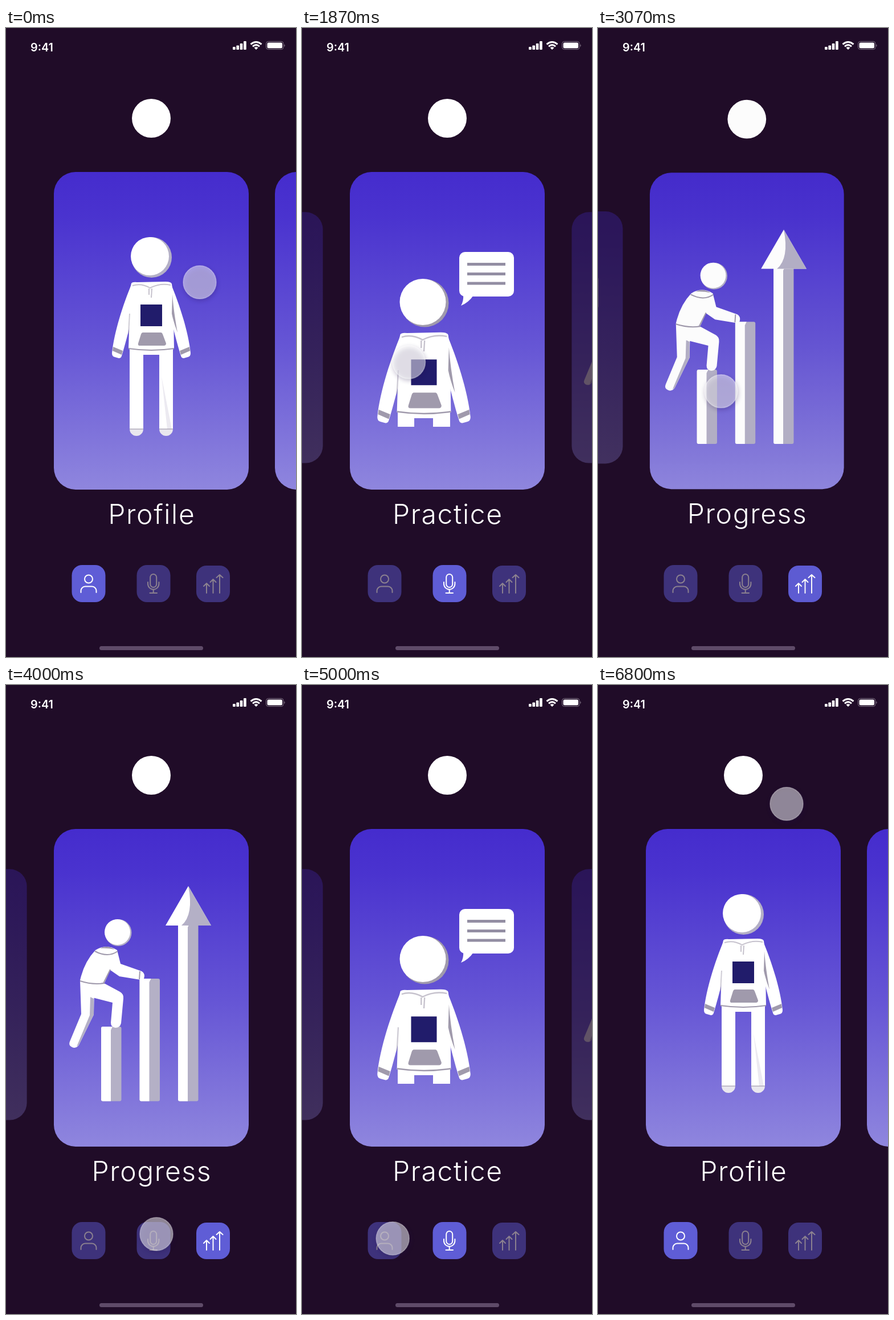
Recreate the animation shown at these times as an HTML page. Size 509 px wide and 1101 px high, loop 6870 ms.

```html
<!DOCTYPE html>
<html lang="en">
<head>
<meta charset="utf-8">
<title>Card carousel</title>
<style>
  html, body { margin: 0; width: 100%; height: 100%; overflow: hidden; background: #200c28; }
  svg { display: block; width: 100vw; height: 100vh; }
  text { font-family: Inter, "Open Sans", sans-serif; fill: #fff; }
  .label { font-size: 48px; font-weight: 300; letter-spacing: 1.6px; text-anchor: middle; }
  .line { fill: none; stroke: #fff; stroke-width: 2; stroke-linecap: round; stroke-linejoin: round; }
  .w { fill: #fff; }
  .s { fill: #b4b0c6; }
  .g { fill: #a09aac; }
  .seam { fill: none; stroke: #a09aac; stroke-width: 2; }
</style>
</head>
<body>
<svg viewBox="0 0 509 1101">
  <defs>
    <linearGradient id="sky" x2="0" y2="1">
      <stop offset="0" stop-color="#452ccd"/>
      <stop offset=".14" stop-color="#4a33cf"/>
      <stop offset=".55" stop-color="#6656d5"/>
      <stop offset="1" stop-color="#8f86de"/>
    </linearGradient>
    <radialGradient id="press">
      <stop offset="0" stop-color="#d9d2ff" stop-opacity=".6"/>
      <stop offset=".6" stop-color="#b9b2f4" stop-opacity=".4"/>
      <stop offset="1" stop-color="#b9b2f4" stop-opacity=".36"/>
    </radialGradient>
    <filter id="blur" x="-30%" y="-30%" width="160%" height="160%"><feGaussianBlur stdDeviation="4"/></filter>

    <g id="card">
      <circle class="w" cx="255" cy="158" r="34"/>
      <rect x="84" y="252" width="342" height="556" rx="38" fill="url(#sky)"/>
    </g>

    <g id="hoodie">
      <g id="sleeve">
        <path class="w" d="M221 447C207 480 190 530 186 569Q186 575 191 576L198 578Q202 578 203 574C210 552 215 530 222 505Z"/>
        <path class="g" d="M188 558L205 565L203 572L187 565Z"/>
      </g>
      <use href="#sleeve" transform="translate(510 0) scale(-1 1)"/>
      <path class="w" d="M220 447Q222 444 230 445L280 444Q290 444 291 448Q295 475 294 500L295 562Q255 568 215 562L217 500Q214 470 220 447Z"/>
      <path class="g" d="M292 466Q294 495 301 533Q294 515 291 500Z"/>
      <path class="seam" d="M215 561Q255 567 295 561"/>
      <path class="seam" stroke-width="1" opacity=".6" d="M222 451Q237 446 253 455Q270 446 289 450M251 456L251 467M256 456L255 472"/>
      <path class="seam" opacity=".5" d="M217 500L215 535"/>
      <path class="g" d="M240 533H272Q274 533 275 536L281 552Q281 556 277 556H235Q231 556 232 552L237 536Q238 533 240 533Z"/>
      <rect x="236" y="484" width="38" height="38" fill="#211c6b"/>
    </g>
  </defs>

  <g id="c0">
    <use href="#card"/>
    <circle class="s" cx="255.500" cy="401.500" r="35.500"/>
    <circle class="w" cx="252.500" cy="399.500" r="33.500"/>
    <path class="w" d="M217 560H293V702H269V572H241V702H217Z"/>
    <path fill="#eceaf1" d="M273 610L291 702H283Z"/>
    <path fill="#e9e7ee" d="M217 702H241A12 12 0 0 1 217 702ZM269 702H293A12 12 0 0 1 269 702Z"/>
    <path class="seam" stroke-width="1" d="M217 702H241M269 702H293" opacity=".6"/>
    <use href="#hoodie"/>
  </g>

  <g id="c1">
    <use href="#card"/>
    <circle class="g" cx="215.500" cy="481.500" r="42"/>
    <circle class="w" cx="212" cy="479.500" r="40.500"/>
    <path class="w" d="M168 668H260V698H230V683H197V698H168Z"/>
    <use href="#hoodie" transform="translate(214 534) scale(1.185) translate(-255 -445)"/>
    <rect class="w" x="276" y="392" width="96" height="78" rx="10"/>
    <path class="w" d="M283 466Q284 478 279 486Q292 481 301 468Z"/>
    <path d="M290 413.500H357M290 430.500H357M290 447H357" stroke="#938ea3" stroke-width="5"/>
  </g>

  <g id="c2">
    <use href="#card"/>
    <g id="bars"></g>
    <path class="w" d="M320 352L360 421H280Z"/>
    <path class="s" d="M320 352L360 421H308Q330 402 320 352Z"/>
    <circle class="s" cx="197" cy="433.500" r="23.500"/>
    <circle class="w" cx="195.500" cy="432.500" r="22.500"/>
    <g transform="translate(-7 0)">
      <path class="w" d="M137 517L162 530L161 577L135 630Q130 637 123 634Q116 631 119 624L139 576Z"/>
      <path class="s" d="M155 546L161 549V577L135 630L131 633L154 578Z"/>
      <path class="w" d="M138 516L181 523L207 537Q214 541 213 549L209 592Q207 600 199 600Q191 599 191 591L194 556L155 546L140 540Z"/>
      <path class="w" d="M164 464Q183 452 202 464L208 488L245 501Q252 505 249 514L243 516L206 510L190 499L180 521Q158 525 137 517Q144 485 164 464Z"/>
      <path class="g" d="M172 461Q184 454 198 463Q185 460 172 461Z"/>
      <path class="seam" stroke-width="1.500" d="M163 466Q186 478 203 466M242 501L241 515M137 518Q158 525 180 522M190 498L178 522"/>
    </g>
  </g>

  <text id="l0" class="label"></text>
  <text id="l1" class="label"></text>
  <text id="l2" class="label"></text>

  <g id="i0">
    <rect x="115.500" y="940" width="59" height="65" rx="18" fill="#5f5dd6"/>
    <circle class="line" cx="145" cy="964.500" r="7"/>
    <path class="line" d="M131.500 988V985A8 8 0 0 1 139 977.500H151A8 8 0 0 1 158.500 985V988"/>
  </g>
  <g id="i1">
    <rect x="229.500" y="940" width="59" height="65" rx="18" fill="#5f5dd6"/>
    <rect class="line" x="253.200" y="956" width="11" height="23" rx="5.500"/>
    <path class="line" d="M249 970V973A9.700 9.700 0 0 0 268.400 973V970M258.700 983V989M252.500 989H265"/>
  </g>
  <g id="i2">
    <rect x="334" y="941" width="59" height="64" rx="18" fill="#5f5dd6"/>
    <path class="line" d="M352 989V972M347 977L352 972L357 977M363.500 989V965M358.500 970L363.500 965L368.500 970M375 989V957M369.500 962L375 957L380.500 962"/>
  </g>

  <text x="43" y="40.500" font-size="19.800" font-weight="600">9:41</text>
  <g id="signal" class="w"></g>
  <path class="w" d="M439 38L435.500 34.500Q439 32 442.500 34.500Z"/>
  <path d="M429.500 28.500Q439 20.500 448.500 28.500M433 32.300Q439 27 445 32.300" fill="none" stroke="#fff" stroke-width="3"/>
  <rect x="456.500" y="23.500" width="30.500" height="14" rx="4" fill="none" stroke="#7e7284"/>
  <rect class="w" x="458.500" y="25.500" width="26.500" height="10" rx="2.500"/>
  <path d="M488.300 28.500Q491 30.500 488.300 33Z" fill="#7e7284"/>
  <rect x="164" y="1082" width="182" height="7" rx="3.500" fill="#5f4b69"/>

  <g id="cursor">
    <circle r="29" cx="1" cy="3" fill="#1b0a4a" opacity=".28" filter="url(#blur)"/>
    <circle id="idle" r="29" fill="#fff" fill-opacity=".5" stroke="#fff" stroke-opacity=".35" stroke-width="1.500"/>
    <circle id="held" r="28.500" fill="url(#press)"/>
  </g>
</svg>
<script>
const LOOP = 6870, STEP = 200 / 3;
const $ = id => document.getElementById(id);
const clamp = v => Math.min(1, Math.max(0, v));
const set = (el, attrs) => { for (const k in attrs) el.setAttribute(k, attrs[k]); };

$('bars').innerHTML = [598, 514, 418].map((y, i) => {
  const x = 167 + 67.5 * i;
  return `<rect class="s" x="${x}" y="${y}" width="35.500" height="${728.5 - y}" rx="3"/>` +
    `<path class="w" d="M${x + 3} ${y}H${x + 20}L${x + 17} ${y + 6}V728.500H${x + 3}Q${x} 728.500 ${x} 725.500V${y + 3}Q${x} ${y} ${x + 3} ${y}Z"/>`;
}).join('');

$('signal').innerHTML = [5, 7.5, 11, 15].map((h, i) =>
  `<rect x="${398 + 6.35 * i}" y="${38 - h}" width="4.700" height="${h}" rx="1"/>`).join('');

// page 0 Profile, 1 Practice, 2 Progress: two drags forward, two taps back
const drags = [
  { at: 930, ms: 590, by: 1 },
  { at: 2200, ms: 1000, by: 1 }
];
const taps = [
  { at: 4168, ms: 600, by: -1 },
  { at: 5670, ms: 600, by: -1 }
];

// each move leads from the last resting place to x, y
const path = [
  { at: 70, ms: 730, x: 345, y: 535 },
  { at: 920, ms: 470, x: 36, y: 540 },
  { at: 1500, ms: 700, x: 232, y: 598 },
  { at: 2200, ms: 440, x: 36, y: 609 },
  { at: 2650, ms: 450, x: 217, y: 636 },
  { at: 3100, ms: 800, x: 264, y: 961 },
  { at: 4500, ms: 800, x: 142, y: 970 },
  { at: 6070, ms: 730, x: 331, y: 208, power: 1 }
];

const easeOut = (t, { at, ms, power = 2 }) => 1 - (1 - clamp((t - at) / ms)) ** power;

const pageAt = t => [...drags, ...taps].reduce((p, m) => p + m.by * easeOut(t, m), 0);

const cursorAt = t => path.reduce(([x, y], m) => {
  const e = easeOut(t, m);
  return [x + (m.x - x) * e, y + (m.y - y) * e];
}, [340, 445]);

// a shrinking label box drops the letters that no longer fit
const labels = [
  { word: 'Profile', fit: 9 },
  { word: 'Practice', fit: 8.1 },
  { word: 'Progress', fit: 8 }
];

function place(i, page) {
  const d = i - page, shrinks = d < 0 || i === 2;
  const far = shrinks ? Math.min(1, Math.abs(d)) : 0;
  const s = 1 - .21 * far, x = 255 + d * (shrinks ? 353.5 : 388);
  const opacity = 1 - .71 * far, { word, fit } = labels[i];
  set($('c' + i), {
    opacity,
    transform: `translate(${x} ${530 + 57 * (1 - s)}) scale(${s}) translate(-255 -530)`
  });
  set($('l' + i), { opacity, x: x + .8, y: 868 - 242 * (1 - s) });
  $('l' + i).textContent = word.slice(0, Math.floor(fit * s + .05));
  set($('i' + i), { opacity: .48 + .52 * clamp(1 - Math.abs(d)) ** 2 });
}

function draw(t) {
  const page = pageAt(t);
  for (let i = 0; i < 3; i++) place(i, page);
  set($('cursor'), { transform: `translate(${cursorAt(t)})` });
  const held = Math.max(...drags.map(({ at }) => t < at ? 0 : clamp((at + 260 - t) / 50)));
  set($('idle'), { opacity: 1 - held });
  set($('held'), { opacity: held });
}

const start = performance.now();
function tick() {
  const t = (performance.now() - start) % LOOP;
  draw(Math.floor((t + 4) / STEP) * STEP);
  requestAnimationFrame(tick);
}
tick();
</script>
</body>
</html>
```
